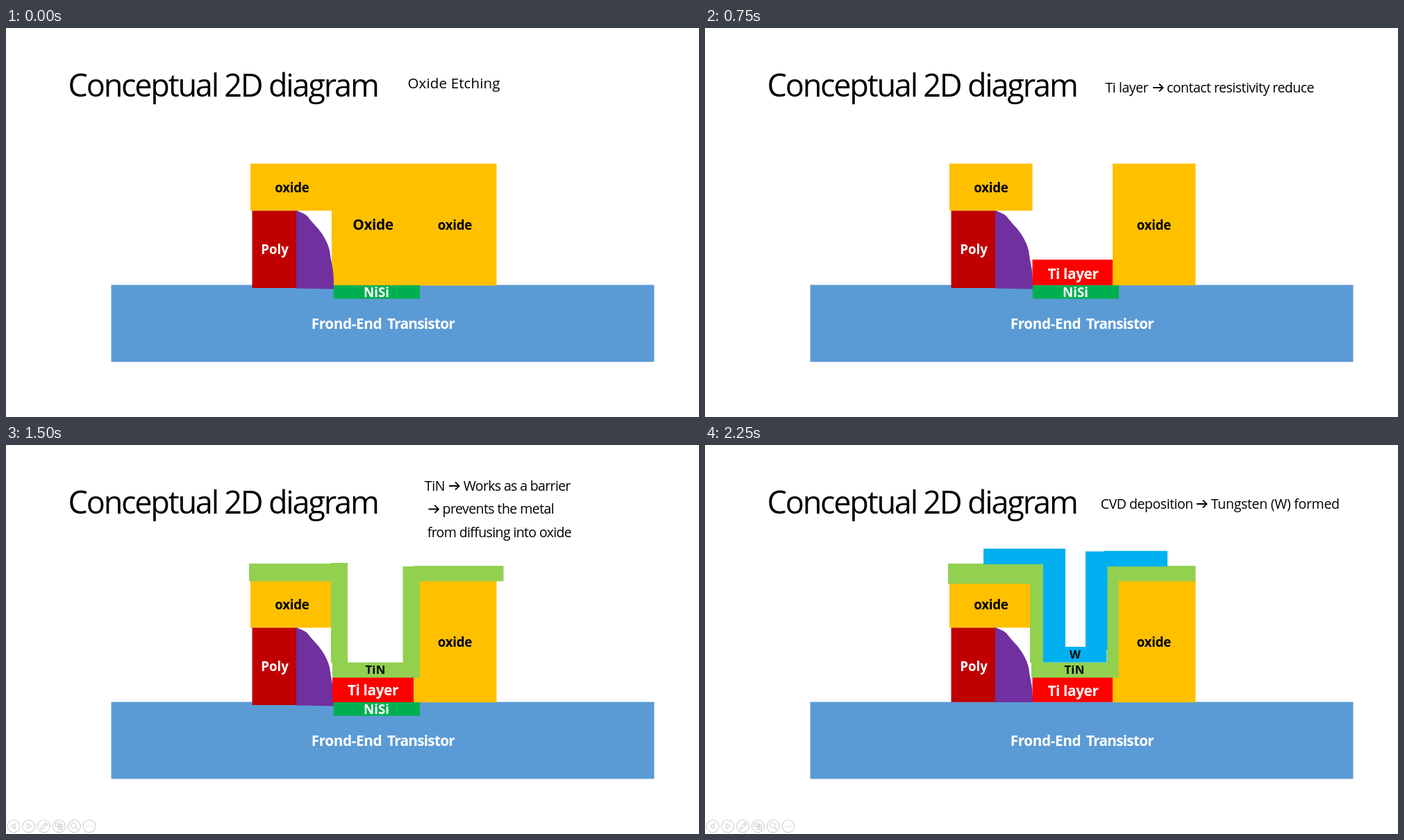
Animation, 998 px wide and 561 px high, one loop 3000 ms. Source, as an HTML page:

```html
<!DOCTYPE html>
<html lang="en">
<head>
<meta charset="utf-8">
<title>Conceptual 2D diagram</title>
<style>
html, body { margin: 0; width: 100%; height: 100%; overflow: hidden; background: #fff; }
svg { display: block; width: 100vw; height: 100vh; }
text { font-family: "Open Sans", "Noto Sans", sans-serif; white-space: pre; }
</style>
</head>
<body>
<svg id="stage" viewBox="0 0 998 561"></svg>
<script>
const STEP = 750, COUNT = 4;
const ORANGE = '#ffc000', GREEN = '#92d050', BLUE = '#00b0f0', RED = '#ff0000';
const stage = document.getElementById('stage');
const steps = [];

function add(parent, tag, attrs, content) {
  const node = document.createElementNS('http://www.w3.org/2000/svg', tag);
  for (const key in attrs) node.setAttribute(key, attrs[key]);
  if (content) node.textContent = content;
  return parent.appendChild(node);
}

// A group shown only during the listed steps
function during(...list) {
  const node = add(stage, 'g', {});
  steps.push({ node, list });
  return node;
}

const box = (g, x1, y1, x2, y2, fill) =>
  add(g, 'rect', { x: x1, y: y1, width: x2 - x1, height: y2 - y1, fill });

const shape = (g, d, fill) => add(g, 'path', { d, fill });

const label = (g, str, x, y, size, spacing = 0, fill = '#000') =>
  add(g, 'text', { x, y, fill, 'font-size': size, 'font-weight': 700,
    'letter-spacing': spacing, 'text-anchor': 'middle' }, str);

const note = (g, str, x, y, spacing = -0.6, size = 19.5) =>
  add(g, 'text', { x, y, 'font-size': size, 'letter-spacing': spacing }, str);

const arrow = (g, x, y) =>
  add(g, 'path', { d: `M${x} ${y}h14.5m-5.5 -5.5l5.5 5.5l-5.5 5.5`,
    fill: 'none', stroke: '#000', 'stroke-width': 1.8 });

function gate(g, bottom) {
  box(g, 354.5, 263.5, 418.5, bottom, '#c00000');
  shape(g, 'M418 263L425 266Q433 269 436 274L441 280L450 290Q459 301 464 314' +
    'Q467 322 467.5 331L470.5 347Q472 357 472 370' +
    (bottom > 371 ? 'V376.5L418 375.5Z' : 'V371H418Z'), '#7030a0');
}

// Always present
add(stage, 'rect', { width: 998, height: 561, fill: '#fff' });
note(stage, 'Conceptual 2D diagram', 89.5, 99, -2.2, 45);
box(stage, 151.5, 370.5, 933.5, 481.5, '#5b9bd5');
label(stage, 'Frond-End', 490.5, 434, 20.8, -0.4, '#fff');
label(stage, 'Transistor', 597.5, 434, 20.8, -0.75, '#fff');

// Oxide layers
let g = during(0);
shape(g, 'M352 195.5H706.5V371.5H469V263.5H352Z', ORANGE);
label(g, 'Oxide', 528.5, 291, 20.8, -0.35);
note(g, 'Oxide Etching', 578.5, 87, 0.15, 20.5);

g = during(1);
box(g, 352, 195.5, 471.5, 263.5, ORANGE);
g = during(2, 3);
box(g, 352, 195.5, 469, 263.5, ORANGE);
g = during(1, 2, 3);
box(g, 587, 195.5, 706.5, 371.2, ORANGE);

gate(during(0, 1, 2), 375);
gate(during(3), 370.8);

g = during(1, 3);
box(g, 471.5, 334, 587, 370.8, RED);
label(g, 'Ti layer', 530, 362.3, 20.8, -0.4, '#fff');
g = during(2);
box(g, 470, 334, 587, 371, RED);
label(g, 'Ti layer', 528.5, 361, 20.8, -0.4, '#fff');

g = during(0, 1, 2);
box(g, 471.8, 371, 596, 390.5, '#00b050');
label(g, 'NiSi', 533.5, 387.5, 18.7, 0, '#fff');

label(stage, 'oxide', 412, 236.5, 18.7, -0.25);
label(stage, 'oxide', 646.5, 290.5, 18.7, -0.25);
label(stage, 'Poly', 387, 325.5, 18.7, 0, '#fff');

// Contact resistivity
g = during(1);
note(g, 'Ti layer', 576.5, 93, -0.45);
arrow(g, 645, 86);
note(g, 'contact resistivity reduce', 665, 93, -0.5);

// Barrier
g = during(2);
shape(g, 'M350 171H468V170H492V313.5H571.5V175H588V174.2H716.5V196.5H595.8' +
  'V335.5H470V314H468V196.5H350Z', GREEN);
note(g, 'TiN', 602.7, 66, -0.3);
arrow(g, 638, 59);
note(g, 'Works as a barrier', 658.8, 66, -0.65);
arrow(g, 608.5, 92.5);
note(g, 'prevents the metal', 628.5, 99, -0.55);
note(g, 'from diffusing into oxide', 606.7, 133, -0.63);

// Tungsten
g = during(3);
shape(g, 'M350 171H487V313.5H579V174.2H706.5V196.5H595.8V335.5H470V314H468' +
  'V200H350Z', GREEN);
shape(g, 'M401 149.5H519V291H548V153.5H574V152.8H666V175.3H579.5V295H578.5' +
  'V313.5H487V172H401Z', BLUE);
label(g, 'W', 533, 308, 16.6);
note(g, 'CVD deposition', 569.8, 92, -0.47);
arrow(g, 708, 85);
note(g, 'Tungsten (W) formed', 728.8, 92, -0.3);

g = during(2, 3);
label(g, 'TiN', 532, 330.3, 16.8, 0.2);

// Slide show controls
const controls = add(g, 'g', { fill: 'none', stroke: '#cfcfcf', 'stroke-width': 1.1 });
[11, 32.8, 54.6, 76.4, 98.2, 120].forEach(cx =>
  add(controls, 'circle', { cx, cy: 549.8, r: 9 }));
[
  'M13 546V553.5L7.5 549.8Z',
  'M30.8 546V553.5L36.3 549.8Z',
  'M50 554.5L51.2 551L57.5 544.7L59.8 547L53.5 553.3ZM56 546.2L58.3 548.5',
  'M71.5 545H77.5V550H71.5ZM75 547.5H81.3V554.5H75ZM75 551H81.3M78.2 547.5V554.5',
  'M100.2 551.5L103.5 555'
].forEach(d => add(controls, 'path', { d }));
add(controls, 'circle', { cx: 97.2, cy: 548.5, r: 3.8 });
[116.2, 120, 123.8].forEach(cx =>
  add(controls, 'circle', { cx, cy: 549.8, r: 0.9, fill: '#cfcfcf', stroke: 'none' }));

function draw(ms) {
  const now = Math.floor(ms / STEP) % COUNT;
  for (const { node, list } of steps)
    node.setAttribute('display', list.includes(now) ? 'inline' : 'none');
}

const start = performance.now();
function tick() {
  draw(performance.now() - start);
  requestAnimationFrame(tick);
}
draw(0);
requestAnimationFrame(tick);
</script>
</body>
</html>
```
